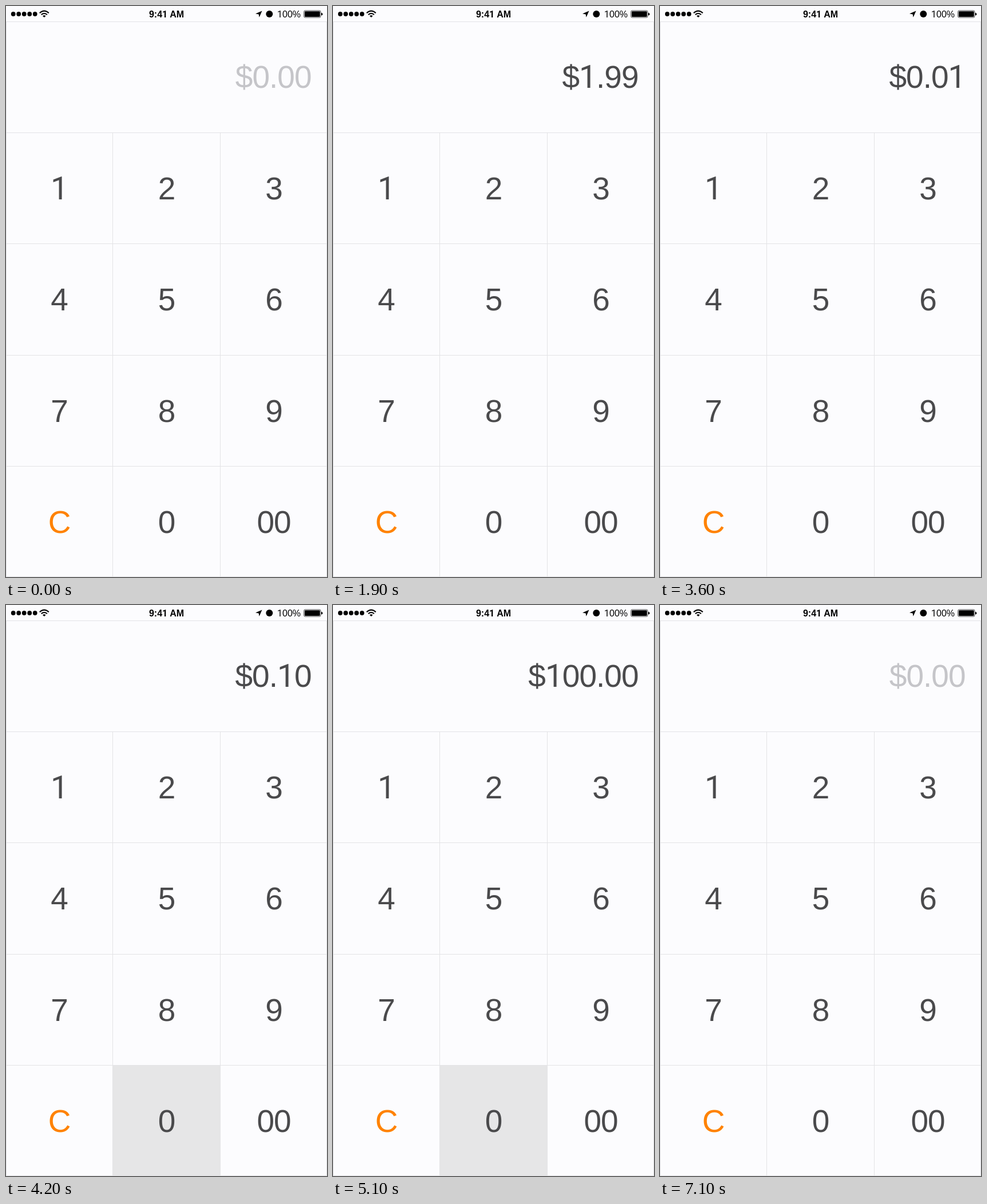
These frames come from a looping animation (561 by 998 pixels, 7.3 s). An HTML page:

```html
<!DOCTYPE html>
<html lang="en">
<head>
<meta charset="utf-8">
<title>Amount keypad</title>
<style>
  html, body { margin: 0; width: 100%; height: 100%; overflow: hidden; background: #fcfcfe; }
  svg { display: block; width: 561px; height: 998px; }
  text { font-family: "Liberation Sans", Arial, sans-serif; white-space: pre; }
  .one { font-family: Roboto, sans-serif; }
  .big { font-size: 55px; letter-spacing: -1px; fill: #4a4a4c; }
  .clear { fill: #ff8200; }
  .empty { fill: #c5c5c9; }
  .status { font-size: 16px; }
  .clock { font-weight: bold; }
  .lines { stroke: #e3e3e6; stroke-width: 1; fill: none; }
</style>
</head>
<body>
<svg id="stage" viewBox="0 0 561 998">
  <rect width="561" height="998" fill="#fcfcfe"/>
  <rect id="glow" fill="#e6e6e7" visibility="hidden"/>
  <path id="grid" class="lines"/>
  <g id="labels"></g>
  <g id="bar">
    <g id="dots"></g>
    <g fill="none" stroke="#000" stroke-width="2.1">
      <path d="M58.8 12.2Q66.8 5.2 74.8 12.2"/>
      <path d="M61.7 15.2Q66.8 10.8 71.9 15.2"/>
    </g>
    <path d="M64 17.3Q66.8 15 69.6 17.3L66.8 20Z"/>
    <path d="M447.5 8.5L442.6 19.8L441.6 14.4L436 13.4Z"/>
    <circle cx="460.3" cy="14" r="6"/>
    <rect x="520.6" y="8" width="29.4" height="12.2" rx="2.2" fill="none" stroke="#000" stroke-width=".7"/>
    <rect x="521.9" y="9.3" width="26.8" height="9.6" rx="1.2"/>
    <path d="M551 11.8Q553.4 12 553.4 14.2T551 16.6Z"/>
  </g>
</svg>
<script>
const LOOP = 7300, HOLD = 100;
const xs = [0.5, 186.5, 374.5, 560.5];
const ys = [27.5, 221.5, 415.5, 610.5, 804.5, 997.5];
const centers = [93, 280.5, 468];
const keys = ["1", "2", "3", "4", "5", "6", "7", "8", "9", "C", "0", "00"];
const presses = [
  [1100, "1"], [1500, "9"], [1800, "9"], [2900, "C"],
  [3500, "1"], [3900, "0"], [4200, "0"], [4500, "0"], [4700, "0"], [5100, "0"],
  [6200, "C"]
];

const $ = id => document.getElementById(id);

function add(parent, tag, attrs = {}) {
  const el = document.createElementNS("http://www.w3.org/2000/svg", tag);
  for (const name in attrs) el.setAttribute(name, attrs[name]);
  return parent.appendChild(el);
}

// The digit 1 uses a face without a foot.
function write(el, str) {
  el.textContent = "";
  for (const part of str.match(/1|[^1]+/g)) {
    add(el, "tspan", part === "1" ? { class: "one" } : {}).textContent = part;
  }
}

function label(parent, str, x, y, anchor, cls) {
  const el = add(parent, "text", { x, y, "text-anchor": anchor, class: cls });
  write(el, str);
  return el;
}

$("grid").setAttribute("d",
  ys.map(y => `M0 ${y}H561`).join("") +
  xs.map((x, i) => `M${x} ${i % 3 ? ys[1] : ys[0]}V997.5`).join(""));

keys.forEach((key, i) => label($("labels"), key, centers[i % 3],
  338 + 194.4 * Math.floor(i / 3), "middle", key === "C" ? "big clear" : "big"));

for (let i = 0; i < 5; i++) add($("dots"), "circle", { cx: 12.7 + 9.5 * i, cy: 14, r: 3.9 });
label($("bar"), "9:41 AM", 280.5, 20, "middle", "status clock");
label($("bar"), "100%", 474, 20, "start", "status");

const display = label($("labels"), "$0.00", 533.5, 143, "end", "big empty");
const money = cents => "$" + (cents / 100).toLocaleString("en-US", { minimumFractionDigits: 2 });
const enter = (cents, key) => key === "C" ? 0 : Number(cents + key);

function light(key) {
  const glow = $("glow");
  glow.setAttribute("visibility", key ? "visible" : "hidden");
  if (!key) return;
  const i = keys.indexOf(key), col = i % 3, row = 1 + Math.floor(i / 3);
  glow.setAttribute("x", xs[col] - 0.5);
  glow.setAttribute("y", ys[row] - 0.5);
  glow.setAttribute("width", xs[col + 1] - xs[col] + 0.5);
  glow.setAttribute("height", ys[row + 1] - ys[row] + 0.5);
}

let shown = "$0.00", lit = "";
function draw() {
  const t = performance.now() % LOOP;
  let cents = 0, held = "";
  for (const [at, key] of presses) {
    if (t >= at + HOLD) cents = enter(cents, key);
    else if (t >= at) held = key;
  }
  const amount = money(cents);
  if (amount !== shown) {
    shown = amount;
    write(display, amount);
    display.setAttribute("class", cents ? "big" : "big empty");
  }
  if (held !== lit) light(lit = held);
  requestAnimationFrame(draw);
}
draw();
</script>
</body>
</html>
```
